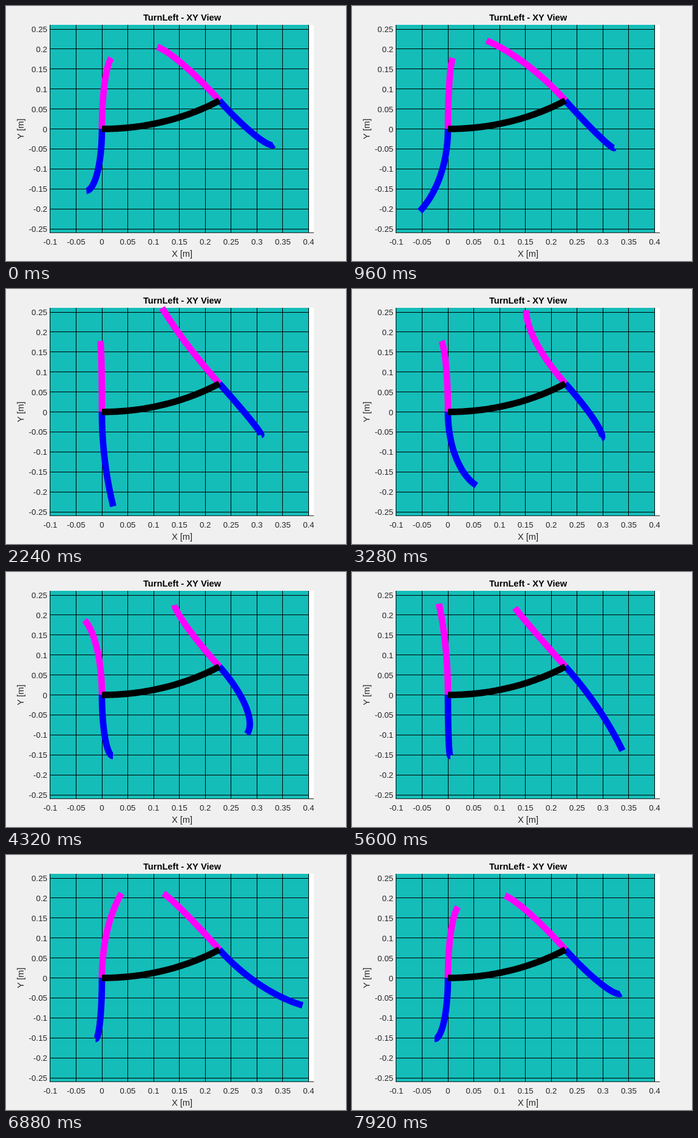
Write an HTML page with a canvas that moves like this. It is 560x420 px and loops after 8 s.

```html
<!DOCTYPE html>
<html>
<head>
<meta charset="utf-8">
<style>
html, body { margin: 0; width: 100%; height: 100%; overflow: hidden; background: #f0f0f0; }
canvas { display: block; }
</style>
</head>
<body>
<canvas id="stage" width="560" height="420"></canvas>
<script>
const ctx = document.getElementById('stage').getContext('2d');
const LOOP = 8000, STEP = 80;
const ORIGIN = [158, 202.5], SCALE = [851, 658];
const TOP = 31, BOTTOM = 374, LEFT = 73, RIGHT = 499;
const FONT = '"Liberation Sans", Arial, sans-serif';
const INK = '#262626';
const LEG_LENGTH = 0.241;

// The foot follows a truncated ellipse: an arc in the air, its chord on the ground.
const HALF_ARC = 2.66, SWING_MID = 1940, HALF_SWING = 2000;

const toPx = (x, y) => [ORIGIN[0] + x * SCALE[0], ORIGIN[1] - y * SCALE[1]];
const toMetres = (x, y) => [(x - ORIGIN[0]) / SCALE[0], (ORIGIN[1] - y) / SCALE[1]];

const TURN = 0.606, BODY_RADIUS = 0.399;
const bodyPoint = a => [BODY_RADIUS * Math.sin(a), BODY_RADIUS * (1 - Math.cos(a))];
const REAR = { at: [0, 0], heading: 0 };
const FRONT = { at: bodyPoint(TURN), heading: TURN };

const MAGENTA = '#ff00ff', BLUE = '#0000ff';
// centre: middle of the ground chord; stride and lift: ellipse axes (pixels)
const legs = [
  { hip: REAR, side: 1, color: MAGENTA, delay: 4000, centre: [158, 85.6], stride: [34, 0], lift: [0, -18.7] },
  { hip: REAR, side: -1, color: BLUE, delay: 0, centre: [158, 303], stride: [48, 0], lift: [0, 30.4] },
  { hip: FRONT, side: 1, color: MAGENTA, delay: 0, centre: [266, 60], stride: [30.5, -15], lift: [-13, -15.3] },
  { hip: FRONT, side: -1, color: BLUE, delay: 4000, centre: [423, 239], stride: [40.5, -23], lift: [22.5, 25.3] }
];

function footAt(leg, time) {
  let s = (time - leg.delay - SWING_MID) / HALF_SWING;
  s = ((s + 1) % 4 + 4) % 4 - 1;
  const swinging = s <= 1;
  const along = swinging ? Math.sin(HALF_ARC * s) : Math.sin(HALF_ARC) * (2 - s);
  const up = swinging ? Math.cos(HALF_ARC * s) - Math.cos(HALF_ARC) : 0;
  return leg.centre.map((c, i) => c + leg.stride[i] * along + leg.lift[i] * up);
}

// Solves sin(a) / a = ratio.
function bendAngle(ratio) {
  let lo = 0.05, hi = 3;
  for (let i = 0; i < 30; i++) {
    const mid = (lo + hi) / 2;
    if (Math.sin(mid) / mid > ratio) lo = mid; else hi = mid;
  }
  return lo;
}

function strokePath(points, color) {
  ctx.strokeStyle = color;
  ctx.lineWidth = 10.67;
  ctx.lineJoin = 'round';
  ctx.beginPath();
  points.forEach(p => ctx.lineTo(p[0], p[1]));
  ctx.stroke();
}

// Top view of a constant-curvature arm reaching from hip to foot.
function drawLeg(leg, time) {
  const { at, heading } = leg.hip;
  const c = Math.cos(heading), s = Math.sin(heading);
  const foot = toMetres(...footAt(leg, time));
  const dx = foot[0] - at[0], dy = foot[1] - at[1];
  const reach = leg.side * (c * dy - s * dx);
  const sway = c * dx + s * dy;
  const bend = bendAngle(reach / LEG_LENGTH);
  const points = [];
  const count = 160;
  for (let i = 0; i <= count; i++) {
    const a = bend * i / count;
    const out = leg.side * reach * Math.sin(a) / Math.sin(bend);
    const across = sway * (1 - Math.cos(a)) / (1 - Math.cos(bend));
    const p = toPx(at[0] + c * across - s * out, at[1] + s * across + c * out);
    if (p[1] < TOP) break;
    points.push(p);
  }
  strokePath(points, leg.color);
}

function drawBody() {
  const points = [];
  for (let i = 0; i <= 60; i++) points.push(toPx(...bodyPoint(TURN * i / 60)));
  strokePath(points, '#000');
}

function label(text, x, y, size, align, color = INK, weight = '') {
  ctx.font = `${weight} ${size}px ${FONT}`;
  ctx.textAlign = align;
  ctx.fillStyle = color;
  ctx.fillText(text, x, y);
}

function drawAxes() {
  ctx.fillStyle = '#f0f0f0';
  ctx.fillRect(0, 0, 560, 420);
  ctx.fillStyle = '#fff';
  ctx.fillRect(LEFT, TOP, 434, BOTTOM - TOP);
  ctx.fillStyle = '#14bdb8';
  ctx.fillRect(LEFT, TOP, RIGHT - LEFT, BOTTOM - TOP);

  for (let i = -2; i <= 8; i++) {
    const x = toPx(i / 20, 0)[0];
    ctx.fillStyle = '#000';
    ctx.fillRect(Math.floor(x), TOP, 1, BOTTOM - TOP);
    label(String(i / 20), x, 393, 13.33, 'center');
  }
  for (let i = -5; i <= 5; i++) {
    const y = toPx(0, i / 20)[1];
    ctx.fillStyle = '#000';
    ctx.fillRect(LEFT, Math.floor(y), RIGHT - LEFT, 1);
    label(String(i / 20), 68, y + 5, 13.33, 'right');
  }
  ctx.fillStyle = INK;
  ctx.fillRect(LEFT, BOTTOM - 1, 434, 1);

  label('TurnLeft - XY View', 290, 24, 14.67, 'center', '#000', 'bold');
  label('X [m]', 290, 413, 14.67, 'center');
  ctx.save();
  ctx.translate(29, 202.5);
  ctx.rotate(-Math.PI / 2);
  label('Y [m]', 0, 0, 14.67, 'center');
  ctx.restore();
}

const start = performance.now();
function render() {
  const elapsed = (performance.now() - start) % LOOP;
  const time = Math.floor(elapsed / STEP) * STEP;
  drawAxes();
  legs.forEach(leg => drawLeg(leg, time));
  drawBody();
  requestAnimationFrame(render);
}
render();
</script>
</body>
</html>
```
